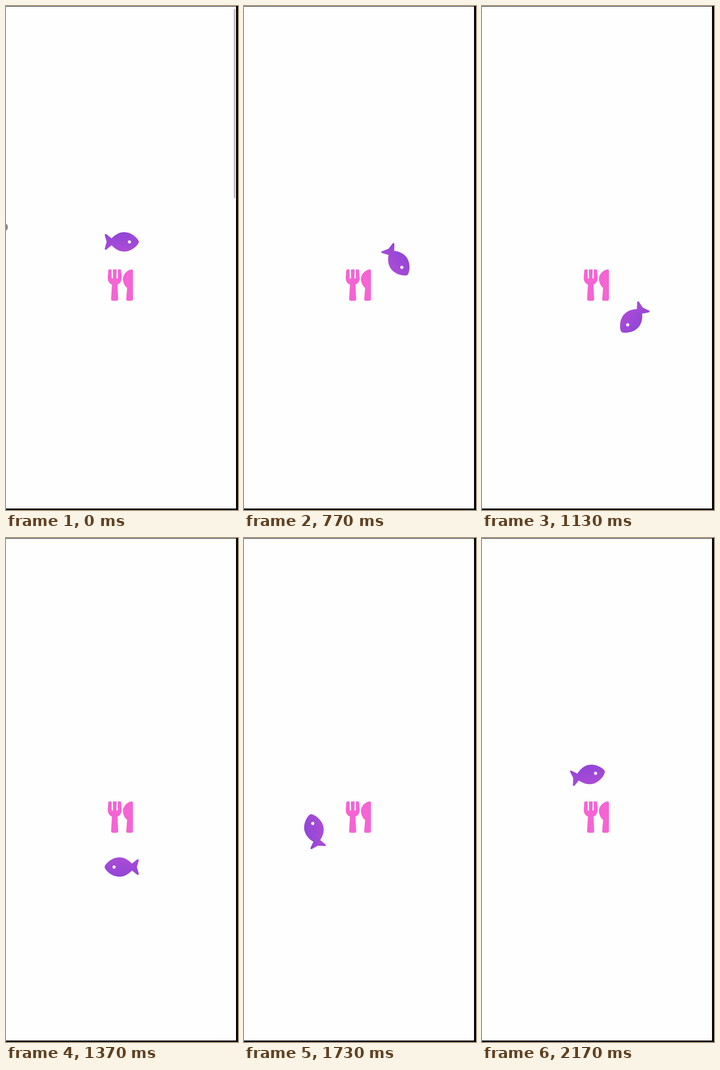
Animation, 468 px wide and 1014 px high, one loop 2210 ms. Source, as an HTML page:

```html
<!DOCTYPE html>
<html lang="en">
<head>
<meta charset="utf-8">
<title>Fish circling cutlery</title>
<style>
  html, body { margin: 0; width: 100%; height: 100%; overflow: hidden; background: #000; }
  svg { display: block; width: 100%; height: 100%; }
</style>
</head>
<body>
<svg viewBox="0 0 468 1014">
  <defs>
    <linearGradient id="skin" x1="0" y1="0" x2="0" y2="1">
      <stop offset="0" stop-color="#9145d7"/>
      <stop offset="1" stop-color="#ab4cd6"/>
    </linearGradient>
  </defs>
  <rect width="468" height="1014" fill="#000"/>
  <rect y="1" width="464" height="1010" fill="#fefefe"/>
  <ellipse id="dot" cy="445" rx="7.5" ry="8" fill="#888"/>
  <rect id="bar" x="459.5" y="6" width="3" rx="1" fill="#b8b8b8"/>

  <g fill="#f564d4">
    <path d="M208.5 530H230Q232 530 232.2 532L233.3 547C233.3 554 229.5 558.5 224.8 560.5L226.3 589.5Q226.3 593 223 593H215.3Q212 593 212 589.5L213.7 560.5C209 558.5 205.2 554 205.2 547L206.3 532Q206.5 530 208.5 530Z"/>
    <path d="M254 530Q256 530 256 532.5V589.5Q256 593 252.8 593H245.5Q242.3 593 242.5 589.5L244.3 567C239 563 236 556.5 236 549C236 539 246 530 254 530Z"/>
  </g>
  <path d="M214.2 529L214.7 547M224.6 529L224.1 547" stroke="#fefefe" stroke-width="2.8" stroke-linecap="round"/>

  <g id="fish">
    <g transform="translate(0 -93.7)">
      <path fill="url(#skin)" d="M34.5 0C34.5 5 21 19.5 5 19.5C-6 19.5 -15 13 -20.5 7L-31 15.3Q-34.5 17 -34.3 13.5L-30.5 0L-34.3 -13.5Q-34.5 -17 -31 -15.3L-20.5 -7C-15 -13 -6 -19.5 5 -19.5C21 -19.5 34.5 -5 34.5 0Z"/>
      <circle cx="15.5" r="3.2" fill="#fefefe"/>
    </g>
  </g>
</svg>
<script>
const LOOP = 2210, HOLD = 370;
const el = id => document.getElementById(id);
const fish = el('fish'), bar = el('bar'), dot = el('dot');

// Index of the 30 fps step, on a 10 ms clock; -1 during the opening hold
const stepAt = t => t < HOLD ? -1 : Math.floor((Math.floor((t - HOLD) / 10) + 1) * 0.3 - 0.01);

function draw(t) {
  const step = stepAt(t);
  const angle = Math.max(0, 180 + 7 * (step - 30));
  const fade = Math.max(0, 1 - (step + 1) / 9);
  fish.setAttribute('transform', `translate(233.5 568.3) rotate(${angle})`);
  bar.setAttribute('height', t < 100 ? 381 : 375);
  bar.setAttribute('opacity', fade);
  dot.setAttribute('cx', -3.6 - (step + 1) * 0.5);
  dot.setAttribute('opacity', fade);
}

const start = performance.now();
function tick() {
  draw((performance.now() - start) % LOOP);
  requestAnimationFrame(tick);
}
tick();
</script>
</body>
</html>
```
